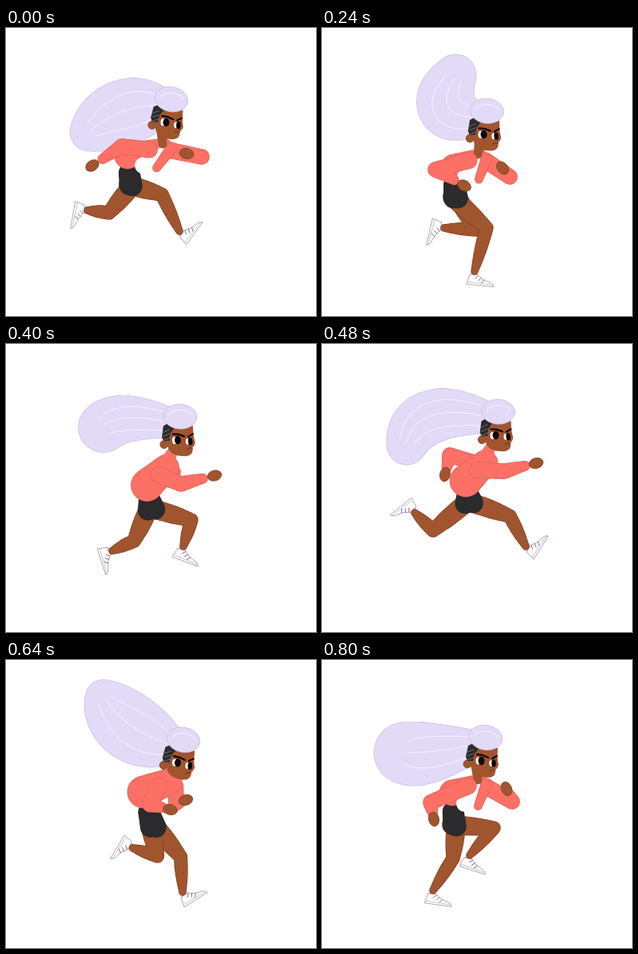
Write an HTML page with a canvas that moves like this. It is 388x360 px and loops after 880 ms.

```html
<!DOCTYPE html>
<html lang="en">
<head>
<meta charset="utf-8">
<title>Runner</title>
<style>
html, body { margin: 0; width: 100%; height: 100%; overflow: hidden; background: #fff; }
canvas { display: block; }
</style>
</head>
<body>
<canvas id="stage" width="388" height="360"></canvas>
<script>
const ctx = document.getElementById('stage').getContext('2d');
const SKIN = '#a0552f', SKIN_EDGE = '#7c3e22', COAT = '#fc7066', COAT_EDGE = '#d9605a';
const HAIR = '#e3daf8', HAIR_EDGE = '#c9bedd', STRAND = '#f8f5ff', INK = '#2b2a2d', SOCK = '#c9bcd6';
const STEP = 80, STEPS = 11;

// Key poses of the rig. Legs: knee, ankle, foot angle. Arms: elbow, hand.
// Hair: middle and tip of the mane, each x, y, radius. Head: eye position, angle.
const keys = [
  { step: 0, open: true, head: [201,118,2], chest: [198,147], hem: [152,160], pelvis: [156,196],
    nearLeg: [195,208, 217,254, -54], farLeg: [129,231, 102,228, 100],
    nearArm: [145,148, 108,172], farArm: [245,161, 226,157], hair: [150,105,41, 104,130,24] },
  { step: 3, open: true, head: [203,133,-3], chest: [197,160], hem: [165,174], pelvis: [166,211],
    nearLeg: [206,250, 191,304, 6], farLeg: [193,252, 153,250, 103],
    nearArm: [142,177, 178,197], farArm: [235,186, 226,175], hair: [157,100,36, 167,59,26] },
  { step: 4, head: [213,126,-5], chest: [197,160], hem: [173,182], pelvis: [179,214],
    nearLeg: [182,259, 150,306, 2], farLeg: [229,225, 189,253, 100],
    nearArm: [210,191, 254,180], farArm: [212,180, 224,177], hair: [170,115,24, 138,118,38] },
  { step: 6, head: [218,114,-5], chest: [204,149], hem: [180,171], pelvis: [184,198],
    nearLeg: [139,233, 116,211, 142], farLeg: [235,215, 255,253, -58],
    nearArm: [228,159, 268,149], farArm: [160,139, 154,163], hair: [140,90,33, 106,126,25] },
  { step: 7, head: [221,126,4], chest: [208,152], hem: [174,161], pelvis: [186,204],
    nearLeg: [160,247, 138,215, 145], farLeg: [231,236, 259,285, -68],
    nearArm: [211,182, 248,171], farArm: [218,163, 214,170], hair: [172,82,44, 136,60,27] },
  { step: 9, open: true, head: [210,131,2], chest: [200,152], hem: [170,169], pelvis: [181,211],
    nearLeg: [219,243, 179,255, 98], farLeg: [206,256, 183,295, 3],
    nearArm: [149,179, 163,203], farArm: [208,194, 236,180], hair: [145,107,40, 108,70,18] },
  { step: 10, open: true, head: [200,126,0], chest: [197,152], hem: [163,166], pelvis: [165,206],
    nearLeg: [215,210, 185,244, 18], farLeg: [164,248, 139,288, 8],
    nearArm: [136,178, 140,199], farArm: [238,177, 231,161], hair: [135,116,37, 103,116,38] }
];

const mix = (a, b, k) => a.map((v, i) => v + (b[i] - v) * k);
const rad = deg => deg * Math.PI / 180;

// In-betweens of the keys; the mane swings up on the way.
function poseAt(step) {
  const next = keys.findIndex(key => key.step >= step);
  const b = keys[next];
  if (b.step === step) return b;
  const a = keys[next - 1], k = (step - a.step) / (b.step - a.step);
  const pose = { open: a.open && b.open };
  for (const part in a) if (Array.isArray(a[part])) pose[part] = mix(a[part], b[part], k);
  const lift = 18 * Math.sin(Math.PI * k);
  pose.hair[1] -= lift / 2;
  pose.hair[4] -= lift;
  return pose;
}

function paint(fill, edge, width = .8) {
  if (fill) { ctx.fillStyle = fill; ctx.fill(); }
  if (edge) { ctx.strokeStyle = edge; ctx.lineWidth = width; ctx.stroke(); }
}

// Outlined chain of round joints [x, y, radius]; bulge fattens each link.
function tube(joints, fill, edge = fill, bulge = 0) {
  for (const [color, grow] of [[edge, .4], [fill, -.3]]) {
    ctx.beginPath();
    for (let i = 1; i < joints.length; i++)
      for (let k = 0; k <= 1; k += 1 / 32) {
        const [x, y, r] = mix(joints[i - 1], joints[i], k);
        const size = Math.max(.5, r + grow + bulge * Math.sin(Math.PI * k));
        ctx.moveTo(x + size, y);
        ctx.arc(x, y, size, 0, 7);
      }
    paint(color);
  }
}

function shape(points, fill, edge) {
  ctx.beginPath();
  for (let i = 0; i < points.length; i += 2) ctx.lineTo(points[i], points[i + 1]);
  ctx.closePath();
  paint(fill, edge);
}

function line(points, color, width) {
  ctx.beginPath();
  for (let i = 0; i < points.length; i += 2) ctx.lineTo(points[i], points[i + 1]);
  paint(null, color, width);
}

function oval(x, y, rx, ry, fill, edge, turn = 0) {
  ctx.beginPath();
  ctx.ellipse(x, y, rx, ry, turn, 0, 7);
  paint(fill, edge);
}

function placed(x, y, turn, drawPart) {
  ctx.save();
  ctx.translate(x, y);
  ctx.rotate(rad(turn));
  drawPart();
  ctx.restore();
}

// Parabola through root, middle and tip, with strands that follow it.
function mane([x, y], hair) {
  const root = [x - 4, y - 20, 17], middle = hair.slice(0, 3), tip = hair.slice(3);
  const at = t => root.map((v, i) =>
    v * (1 - t) * (1 - 2 * t) + middle[i] * 4 * t * (1 - t) + tip[i] * t * (2 * t - 1));
  const spine = Array.from({ length: 17 }, (_, i) => at(i / 16));
  tube(spine, HAIR, HAIR_EDGE);
  for (const side of [-.55, .05, .6]) {
    const strand = [];
    for (let t = .05; t < .98; t += .04) {
      const [px, py, r] = at(t), [qx, qy] = at(t + .02);
      const length = Math.hypot(qx - px, qy - py), out = side * r * (1 - .4 * t * t) / length;
      strand.push(px - (qy - py) * out, py + (qx - px) * out);
    }
    line(strand, STRAND, 1);
  }
}

function shoe() {
  ctx.fillStyle = SOCK;
  ctx.fillRect(-4.5, -3, 9, 9);
  shape([-6,5, 4,4, 11,9, 23,13, 26,17, -8,17], '#fff', '#a697ab');
  line([-7,14, 25,15], '#c4b3c8', .8);
  for (const x of [5, 9, 13]) line([x, x * .6 + 2, x - 3, x * .6 + 6], '#7d6680', .9);
}

function leg(hip, [kx, ky, ax, ay, turn]) {
  placed(ax, ay, turn, shoe);
  tube([[...hip, 11.5], [kx, ky, 8.3], [ax, ay, 4.3]], SKIN, SKIN_EDGE, 1.2);
}

function arm(shoulder, [ex, ey, hx, hy]) {
  const [wx, wy] = mix([ex, ey], [hx, hy], .65);
  tube([[...shoulder, 10], [ex, ey, 9.5], [wx, wy, 6]], COAT, COAT_EDGE);
  oval(hx, hy, 9, 6.5, SKIN, SKIN_EDGE, Math.atan2(hy - ey, hx - ex));
}

function face() {
  oval(-18, 4, 5, 5, SKIN, SKIN_EDGE);
  ctx.beginPath();
  ctx.moveTo(-14, -16);
  ctx.lineTo(20, -16);
  ctx.quadraticCurveTo(19, -2, 21, 5);
  ctx.quadraticCurveTo(20, 9, 17, 11);
  ctx.quadraticCurveTo(18, 21, 7, 21);
  ctx.quadraticCurveTo(-13, 19, -14, 6);
  paint(SKIN);
  shape([-20,-5, -17,-19, -6,-24, -3,-16, -9,-9, -11,0, -18,0], INK);
  for (const y of [-11, -6, -1]) line([-18, y, -10, y - 3], '#8c8792', .7);
  oval(-4.5, 0, 3, 4.5, '#fff');
  oval(-.5, 0, 4, 5.2, '#0c090b');
  oval(11.5, 3, 2.3, 3.8, '#fff');
  oval(15, 3, 2.8, 4.8, '#0c090b');
  line([-6,-8, 1,-7, 8,-4], '#0c090b', 2.3);
  line([13,-3, 19,-6], '#0c090b', 2);
  line([10,13, 14,11, 17,12], '#6f3320', 1);
}

function fringe() {
  oval(5, -29, 21, 15.5, HAIR, HAIR_EDGE, .15);
  ctx.beginPath();
  ctx.ellipse(6, -28, 15, 9, .15, 3.3, 5.8);
  paint(null, STRAND, 1);
}

function draw({ open, head, chest, hem, pelvis, nearLeg, farLeg, nearArm, farArm, hair }) {
  ctx.fillStyle = '#fff';
  ctx.fillRect(0, 0, 388, 360);
  mane(head, hair);

  const [px, py] = pelvis, [cx, cy] = chest;
  const nearHip = [px - 3, py], farHip = [px + 3, py];
  const waist = mix(pelvis, hem, .4);
  leg(farHip, farLeg);
  leg(nearHip, nearLeg);
  for (const [hip, knee] of [[farHip, farLeg], [nearHip, nearLeg]])
    tube([[...waist, 13], [...mix(hip, knee, .04), 12.5]], INK);

  arm([cx + 8, cy + 6], farArm);
  tube([[...chest, open ? 9 : 16], [...hem, open ? 16 : 20]], COAT, COAT_EDGE);
  if (open) {
    const belly = mix(chest, waist, .72);
    tube([[cx - 2, cy + 6, 4], [belly[0] + 5, belly[1], 10]], '#fff');
    tube([[cx + 9, cy + 3, 7], [belly[0] + 22, belly[1] + 3, 5]], COAT, COAT_EDGE);
  }
  tube([[head[0] - 6, head[1] + 13, 6], [cx - 2, cy - 2, open ? 5 : 9]], open ? SKIN : COAT);
  arm(mix(chest, hem, .4), nearArm);

  placed(...head, () => { face(); fringe(); });
}

const start = performance.now();
function tick() {
  draw(poseAt(Math.floor((performance.now() - start) / STEP) % STEPS));
  requestAnimationFrame(tick);
}
ctx.lineCap = ctx.lineJoin = 'round';
tick();
</script>
</body>
</html>
```
